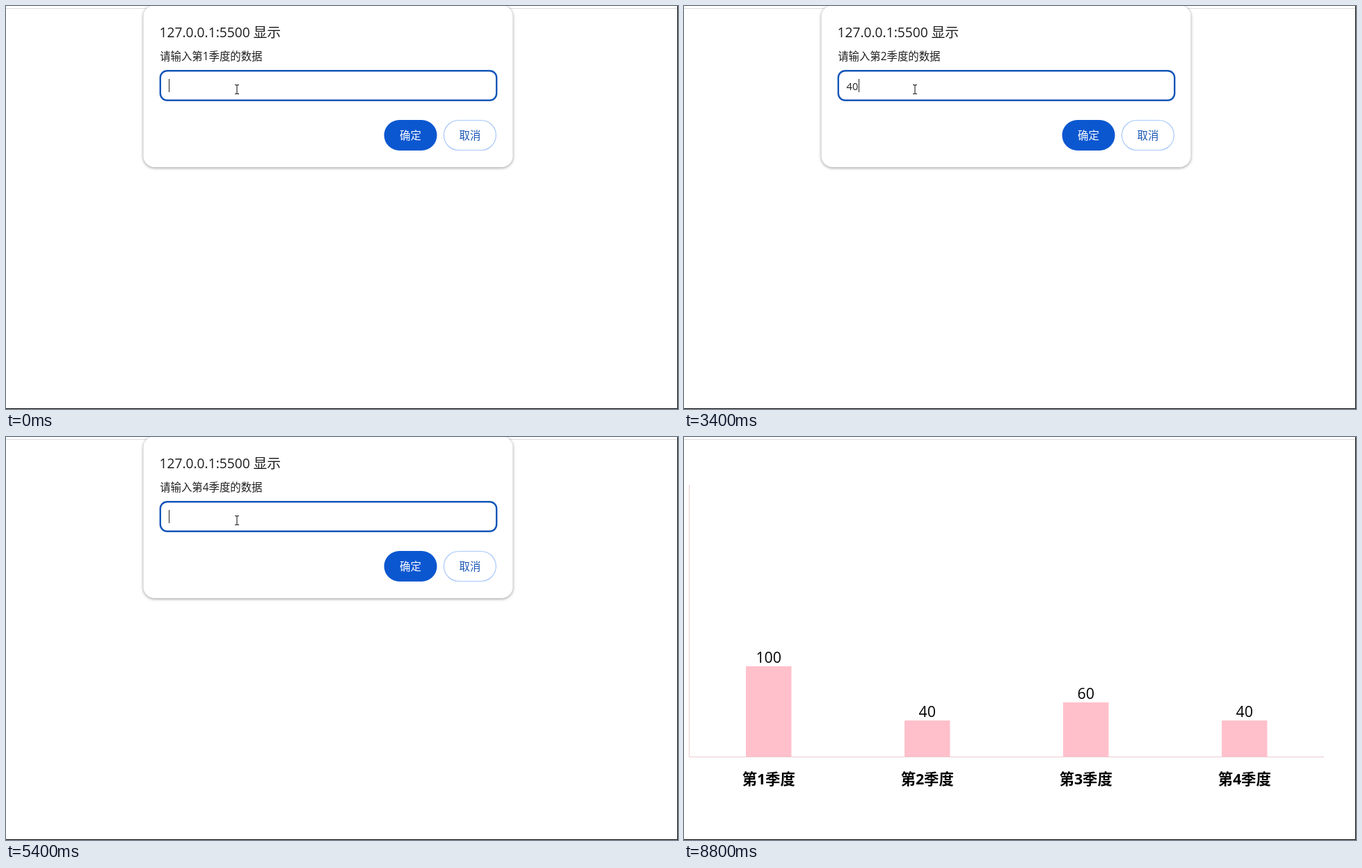
An HTML page that plays this animation: 966 by 580 pixels, repeating every 8900 ms.

```html
<!DOCTYPE html>
<html lang="zh-CN">
<head>
<meta charset="utf-8">
<title>Quarterly chart</title>
<style>
  html, body { margin: 0; width: 100%; height: 100%; overflow: hidden; background: #fff; }
  svg { display: block; width: 966px; height: 580px; }
  text { font-family: "Open Sans", "Noto Sans CJK SC", "Noto Sans CJK", sans-serif; fill: #1f1f1f; white-space: pre; }
  .panel { fill: #fff; filter: drop-shadow(0 1px 2px rgba(0, 0, 0, .42)); }
  .small { font-size: 15.4px; }
  .typed { font-size: 14.7px; }
  .mid { text-anchor: middle; }
  #chart text { fill: #000; font-size: 21.3px; }
  #chart .label { font-weight: 700; }
</style>
</head>
<body>
<svg viewBox="0 0 966 580">
  <rect y="3" width="965" height="1" fill="#dcdcde"/>

  <g id="chart">
    <path d="M7.5 69V460.5H920" fill="none" stroke="#edcbd1"/>
  </g>

  <g id="dialog">
    <rect class="panel" x="197.5" y="-1" width="531" height="233" rx="16"/>
    <text x="220.5" y="44.5" font-size="19.2">127.0.0.1:5500</text>
    <text x="355.5" y="44.8" font-size="19.8">显示</text>
    <text id="question" class="small" x="221.2" y="78"></text>
    <rect x="221.8" y="93.2" width="483.4" height="42.6" rx="10" fill="#fff" stroke="#1456b8" stroke-width="2.4"/>
    <text id="typed" class="typed" x="233.6" y="120.5"></text>
    <rect id="caret" y="105" width="1" height="19" fill="#222"/>
    <path d="M329 113.5H331L332 114.5L333 113.5H335M332 114.5V125.5M329 126.5H331L332 125.5L333 126.5H335"
      fill="none" stroke="#222" stroke-width="1.1"/>
    <rect x="543.5" y="164" width="76" height="44" rx="22" fill="#0b57d0"/>
    <text class="small mid" x="581.5" y="191.5" style="fill:#fff">确定</text>
    <rect x="629.4" y="164.5" width="75" height="43" rx="21.5" fill="#fff" stroke="#a8c7fa" stroke-width="1.2"/>
    <text class="small mid" x="667" y="191.5" style="fill:#1a57b4">取消</text>
  </g>

  <path d="M965.5 0V579.5H0" fill="none" stroke="#000"/>
</svg>
<script>
  const LOOP = 8900;
  const CHART_AT = 7100;
  const DIGIT_WIDTH = 8.4;
  const sales = [100, 40, 60, 40];

  // start time, quarter, typed text, caret shown, dialog opacity
  const steps = [
    [0, 1, "", 1, 1],
    [100, 1, "", 0, 1],
    [400, 1, "1", 1, 1],
    [600, 1, "10", 1, 1],
    [800, 1, "100", 1, 1],
    [900, 1, "1000", 1, 1],
    [1400, 1, "1000", 0, 1],
    [1500, 1, "100", 1, 1],
    [1900, 2, "", 1, .5],
    [2000, 2, "", 1, 1],
    [2500, 2, "", 0, 1],
    [3000, 2, "", 1, 1],
    [3200, 2, "4", 1, 1],
    [3400, 2, "40", 1, 1],
    [3800, 3, "", 1, .5],
    [3900, 3, "", 1, 1],
    [4300, 3, "", 0, 1],
    [4700, 3, "6", 1, 1],
    [4900, 3, "60", 1, 1],
    [5200, 4, "", 1, .5],
    [5300, 4, "", 1, 1],
    [5800, 4, "", 0, 1],
    [6300, 4, "4", 1, 1],
    [6400, 4, "40", 1, 1],
    [7000, 4, "40", 0, 1],
    [CHART_AT, 4, "", 0, 0]
  ];

  const [chart, dialog, question, typed, caret] =
    ["chart", "dialog", "question", "typed", "caret"].map(id => document.getElementById(id));

  function add(tag, attrs, content = "") {
    const node = document.createElementNS("http://www.w3.org/2000/svg", tag);
    for (const key in attrs) node.setAttribute(key, attrs[key]);
    node.textContent = content;
    chart.append(node);
  }

  sales.forEach((value, i) => {
    const x = 89 + 228 * i;
    const height = value * 1.3;
    const middle = x + 32.7;
    add("rect", { x, y: 460 - height, width: 65.4, height, fill: "#ffc0cb" });
    add("text", { x: middle, y: 455 - height, class: "mid" }, value);
    add("text", { x: middle, y: 500, class: "mid label" }, `第${i + 1}季度`);
  });

  let current;

  function draw() {
    const time = performance.now() % LOOP;
    const step = steps.findLast(([start]) => start <= time);
    if (step !== current) {
      current = step;
      const [start, quarter, value, caretOn, opacity] = step;
      chart.style.display = start >= CHART_AT ? "" : "none";
      dialog.style.opacity = opacity;
      question.textContent = `请输入第${quarter}季度的数据`;
      typed.textContent = value;
      caret.setAttribute("x", Math.round(234 + DIGIT_WIDTH * value.length));
      caret.style.display = caretOn ? "" : "none";
    }
    requestAnimationFrame(draw);
  }
  draw();
</script>
</body>
</html>
```
